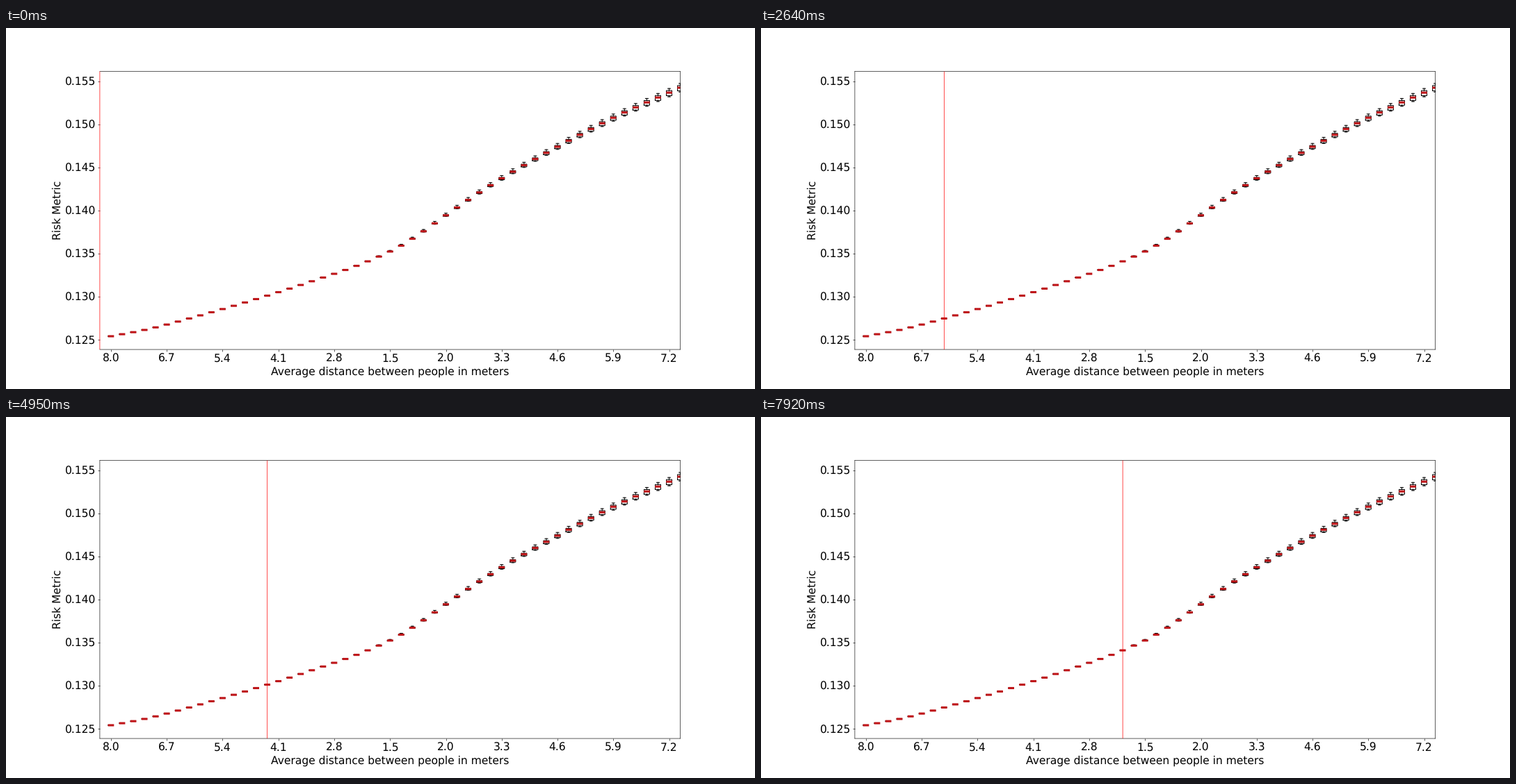
Recreate the animation shown at these times as a matplotlib script. Size 1077 by 520 pixels, loop 8 s.

```python
import matplotlib.pyplot as plt
import numpy as np
from matplotlib.animation import FuncAnimation
from matplotlib.collections import LineCollection

WIDTH, HEIGHT = 1077, 520
DPI = WIDTH / 19.2
LOOP_MS, INTERVAL, STEP_MS = 8000, 20, 330
BOXES = 52

plt.rcParams.update({
    "font.family": "DejaVu Sans",
    "font.size": 20,
    "text.hinting": "none",
})


def smooth(x, xk, yk):
    """Cubic Hermite curve through a few key points."""
    slope = np.gradient(yk, xk)
    i = np.clip(np.searchsorted(xk, x, side="right") - 1, 0, len(xk) - 2)
    h = xk[i + 1] - xk[i]
    u = (x - xk[i]) / h
    ease = u * u * (3 - 2 * u)
    return (yk[i] + (yk[i + 1] - yk[i]) * ease
            + h * u * (1 - u) * ((1 - u) * slope[i] - u * slope[i + 1]))


# Key points of the risk curve: box number and median
key_pos = np.array([1, 4, 9, 14, 19, 24, 27, 29, 31, 35, 41, 46, 52])
key_risk = np.array([.12542, .12615, .12784, .12973, .13180, .13411, .13593,
                     .13760, .13945, .14294, .14741, .15077, .15426])
pos = np.arange(1, BOXES + 1)
median = smooth(pos, key_pos, key_risk)

# The spread grows once the distance starts to rise again
spread = np.clip((pos - 24) / 27, 0, None)
q1 = median - 35e-5 * spread
q3 = median + 24e-5 * spread
low = median - 48e-5 * spread
high = median + 48e-5 * np.sqrt(spread)

# The axes sit on half pixels of a 1920 by 927 window
fig = plt.figure(figsize=((WIDTH + 0.01) / DPI, (HEIGHT + 0.01) / DPI),
                 dpi=DPI, facecolor="white")
ax = fig.add_subplot()
fig.subplots_adjust(left=240.5 / 1920, right=1728.5 / 1920,
                    bottom=101.5 / 927, top=815.5 / 927)


def add_lines(paths, color, width, zorder, cap):
    lines = LineCollection(paths, colors=color, linewidths=width,
                           zorder=zorder, capstyle=cap, joinstyle="miter")
    lines.set_snap(False)
    ax.add_collection(lines, autolim=False)


def flat(x, y, half):
    return [(x - half, y), (x + half, y)]


outlines, bars = [], []
for x, m, a, b, lo, hi in zip(pos, median, q1, q3, low, high):
    left, right = x - 0.25, x + 0.25
    outlines += [
        [(left, a), (right, a), (right, b), (left, b), (left, a)],
        [(x, a), (x, lo)],
        [(x, b), (x, hi)],
        flat(x, lo, 0.125),
        flat(x, hi, 0.125),
    ]
    bars.append(flat(x, m, 0.27))

add_lines(outlines, "black", 1.3, 2, "projecting")
add_lines(bars, "#bf1519", 4.0, 2.1, "butt")

ax.set_xlim(0, BOXES)
ax.set_ylim(0.123883, 0.156149)
distances = np.r_[np.arange(8.0, 1.4, -1.3), np.arange(2.0, 7.3, 1.3)]
ax.set_xticks(pos[::5], [f"{d:.1f}" for d in distances])
risks = np.arange(125, 156, 5) / 1000
ax.set_yticks(risks, [f"{r:.3f}" for r in risks])
ax.set_xlabel("Average distance between people in meters")
ax.set_ylabel("Risk Metric")
for spine in ax.spines.values():
    spine.set_snap(False)

cursor = ax.axvline(0, color="red", linewidth=0.9, zorder=5,
                    clip_on=False, solid_capstyle="butt")
cursor.set_snap(False)


def update(i):
    step = int((i + 0.5) * INTERVAL // STEP_MS)
    cursor.set_xdata([step, step])
    # The cursor replaces the left border while it sits on it
    ax.spines["left"].set_visible(step > 0)
    return cursor, ax.spines["left"]


anim = FuncAnimation(fig, update, frames=LOOP_MS // INTERVAL,
                     interval=INTERVAL, repeat=True, repeat_delay=0)
plt.show()
```
